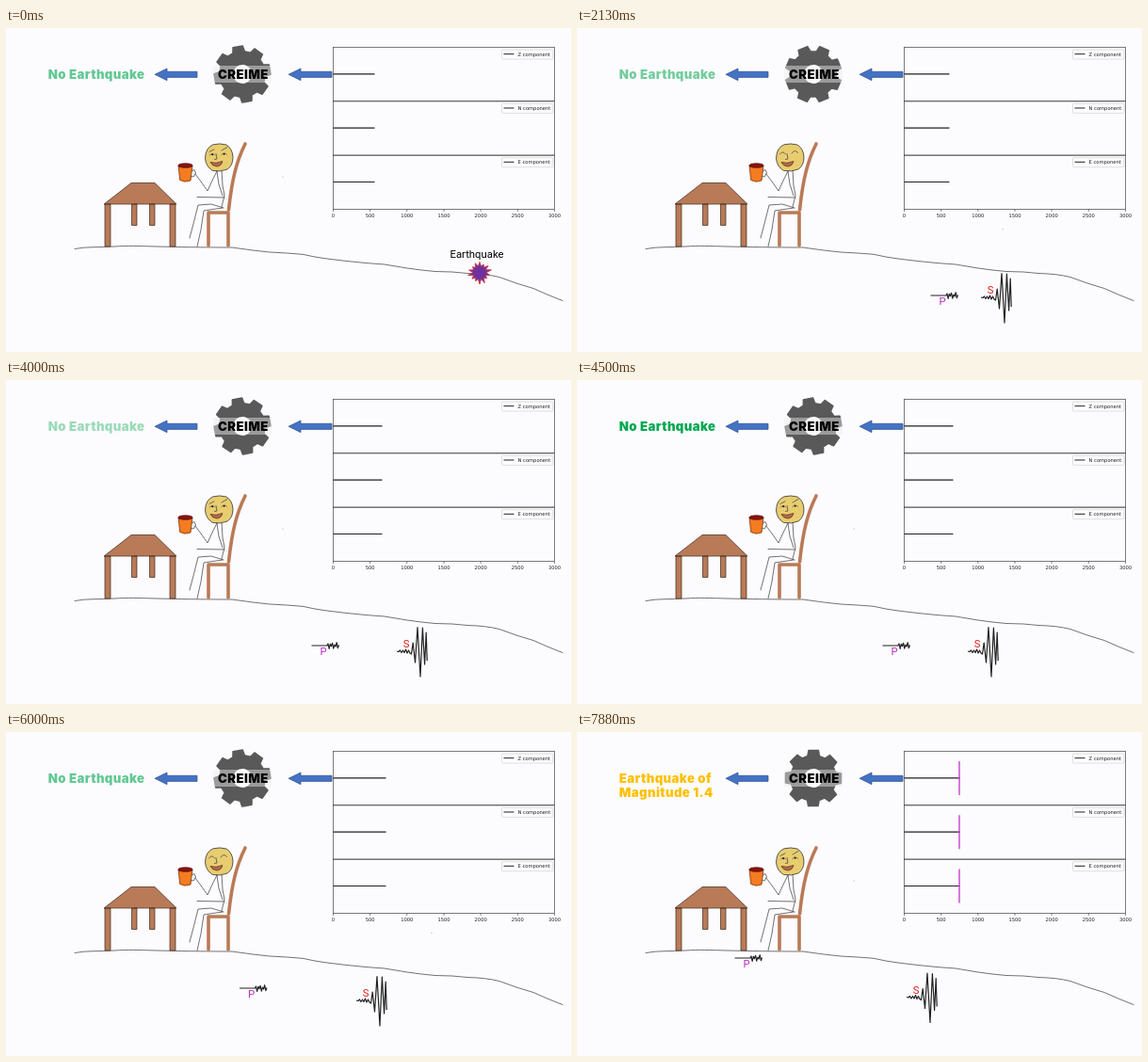
An HTML page for the animation above (8 s loop, 600 by 344 pixels).

```html
<!DOCTYPE html>
<html lang="en">
<head>
<meta charset="utf-8">
<title>Earthquake early warning</title>
<style>
  html, body { margin: 0; width: 100%; height: 100%; overflow: hidden; background: #fcfbfd; }
  svg { display: block; width: 600px; height: 344px; }
  .thin { fill: none; stroke: #444; stroke-width: .75; stroke-linejoin: round; stroke-linecap: round; }
  .wood { fill: #b97a57; stroke: #3a2a22; stroke-width: .7; }
  .chair { fill: none; stroke: #b97a57; stroke-width: 3.6; stroke-linecap: round; }
  .arrow { fill: #4472c4; stroke: #2f528f; stroke-width: .7; }
  .heavy { font: 900 13.2px Inter, "Open Sans", sans-serif; letter-spacing: .4px; }
  .label { font: 11.3px Roboto, sans-serif; }
  .plot { font: 5.2px "DejaVu Sans", sans-serif; fill: #222; }
  .axis { fill: none; stroke: #444; stroke-width: .7; }
  .wave { fill: none; stroke: #222; stroke-width: 1.2; stroke-linejoin: round; }
</style>
</head>
<body>
<svg viewBox="0 0 600 344">
  <rect width="600" height="344" fill="#fcfbfd"/>

  <g id="answer" class="heavy"><text id="line1" x="44.8" y="54"></text><text id="line2" x="44.8" y="69"></text></g>
  <path class="arrow" d="M158 49.3 L171 43 V46.3 H203 V52.4 H171 V55.7Z"/>
  <path class="arrow" d="M300 49.3 L313 43 V46.3 H346 V52.4 H313 V55.7Z"/>
  <path id="gear" fill="#595959" stroke="#595959" stroke-width="1.5" stroke-linejoin="round"/>
  <rect x="220" y="40" width="62" height="18" fill="#eee" opacity=".45"/>
  <circle cx="251" cy="49" r="10" fill="#fcfbfd"/>
  <text class="heavy" x="251.8" y="54" text-anchor="middle">CREIME</text>

  <g id="plots"></g>

  <path class="thin" d="M73 234.5 C85 232 100 233 115 232 S140 231.5 160 232 S210 233 240 233 L262 236 L280 238 Q300 239 315 240.3 L328 243 L341 245 L362 247.5 L382 249.5 L402 251 L426 255 L441 257 L456 258.5 Q475 258.5 490 260.5 Q510 261 524 264.5 L542 271 L560 276.5 L576 283.5 L591 289.5"/>

  <path class="wood" d="M133.5 187H139V209.5H133.5Z M152.5 187H158V209.5H152.5Z M105 187H111V232H105Z M174 187H180V232H174Z M104 187 L133 164.5H158L181 187Z"/>

  <path class="chair" d="M254 123 C245 141 240 160 236.5 193"/>
  <path class="chair" stroke-linejoin="round" d="M215 231V196H236V231"/>

  <path class="thin" d="M201 155 L207 163 L214 173 L219 162 L224 152 M224 152 L226 166 L230 178 M229 151 L230 167 L232 178 L229 190 M203 179.5 L232 180 M231 191 L218 187 L204 188 L200 204 L195 223 M230 191 L210 194 L207 214 L203 232"/>
  <path class="thin" d="M197 152 L200 150.5 L201.5 154 L199 158 L197 157.5"/>
  <path d="M183 146 L184.7 161.5 Q190 164.5 196 162 L198 146Z" fill="#f47c20" stroke="#7a3510" stroke-width=".8"/>
  <ellipse cx="190.5" cy="146" rx="7.6" ry="2.3" fill="#8b1012" stroke="#4a1410" stroke-width=".7"/>

  <path d="M220 123.8 Q227 122 234 124 Q240.5 128 241 137 Q241 146 235 150 Q228 153 219.5 151.5 Q212 147 211.5 138 Q212 127 220 123.8Z" fill="#e8cd70" stroke="#333" stroke-width=".8"/>
  <path class="thin" d="M223 133.5 L224 139 L221.5 139.5"/>
  <path d="M217 142.5 Q223 144.5 230 141.5 Q228.5 147 223.5 147 Q219 146.5 217 142.5Z" fill="#b5694a" stroke="#5a2a20" stroke-width=".7"/>
  <g id="awake">
    <path class="thin" d="M216 131.5 L221 128.8 M229 130 L235 126.5 M216.5 135 Q219 131.5 221.5 135 M229 134.5 Q232 131 234.5 134.5"/>
    <circle cx="219.2" cy="134.3" r=".9"/><circle cx="231.6" cy="133.8" r=".9"/>
  </g>
  <path id="asleep" class="thin" d="M215.5 134 Q218.5 129.5 221.5 134 M228 133 Q231.5 128 234.5 132.5"/>
  <circle id="speck" r=".5" fill="#888"/>

  <g id="quake">
    <text class="label" x="500" y="243.6" text-anchor="middle">Earthquake</text>
    <path id="burst" fill="#7030a0" stroke="#c8383f" stroke-width=".9"/>
  </g>
  <g id="pWave"><path class="wave"/><text class="label" x="9" y="10.3" fill="#b92fc0">P</text></g>
  <g id="sWave"><path class="wave"/><text class="label" x="6.8" y="-4" fill="#e0201c">S</text></g>
</svg>
<script>
const LOOP = 8000, FADE = 460, SPIN = 800;
const $ = id => document.getElementById(id);
const show = (el, on) => el.setAttribute('visibility', on ? 'visible' : 'hidden');
const polar = (cx, cy, r, deg) => {
  const a = (deg - 90) * Math.PI / 180;
  return (cx + r * Math.cos(a)).toFixed(2) + ' ' + (cy + r * Math.sin(a)).toFixed(2);
};

// start time, end of the traces, positions of the P and S waves
const slides = [
  { at: -278, end: 391.5 },
  { at: 1880, end: 395.5, p: [375.5, 284], s: [429, 286] },
  { at: 3825, end: 399.5, p: [324.5, 282], s: [415, 288] },
  { at: 5722, end: 403.5, p: [248, 272], s: [372, 285] },
  { at: 7380, end: 407, p: [167.5, 240], s: [350, 281.5], pick: true }
];

function buildGear() {
  const pts = [];
  for (let a = 0; a < 360; a += 45)
    for (const [r, d] of [[24.3, -15], [30, -10], [30, 10], [24.3, 15]]) pts.push(polar(251, 49, r, a + d));
  $('gear').setAttribute('d', 'M' + pts.join('L') + 'Z');
}

function buildBurst() {
  const pts = [];
  for (let i = 0; i < 28; i++) {
    const r = i % 2 ? 7 : 11.2 + 1.6 * Math.sin(i * 2.3);
    pts.push(polar(503, 259.7, r, i * 360 / 28));
  }
  $('burst').setAttribute('d', 'M' + pts.join('L') + 'Z');
}

function buildWaves() {
  let p = 'M0 0H16.5';
  for (let i = 0; i < 11; i++) p += `L${17.5 + i * 1.15} ${(i % 2 ? 1 : -1) * (2 + 1.5 * Math.sin(i * 1.7))}`;
  $('pWave').firstChild.setAttribute('d', p);
  $('sWave').firstChild.setAttribute('d',
    'M0 0L2 .5 3.5 -1 5 1.5 6.5 -1 8 1.5 9.5 -2 11 2 12.5 -1 14 2 15.5 3 17.2 -9 19.5 12 22 -25.5 25 27 27.4 -25 29.6 14 31.2 -20 32.2 10');
}

function buildPlots() {
  const out = [];
  ['Z', 'N', 'E'].forEach((name, i) => {
    const y = 20.5 + i * 57.3, mid = y + 28.4;
    out.push(`<rect class="axis" x="347.5" y="${y}" width="235" height="57.3"/>
      <path class="trace" stroke="#222" stroke-width="1.2" data-y="${mid}"/>
      <path class="pick" stroke="#c94fd0" stroke-width="1.5" d="M406 ${mid - 18}v36"/>
      <rect x="526.5" y="${y + 2.6}" width="54.5" height="10" rx="1" fill="none" stroke="#ccc" stroke-width=".6"/>
      <path stroke="#222" d="M528.5 ${y + 7.2}h11"/>
      <text class="plot" x="543.5" y="${y + 9.2}">${name} component</text>`);
  });
  for (let v = 0; v <= 3000; v += 500) {
    const x = 347.5 + v * 235 / 3000;
    out.push(`<path stroke="#444" stroke-width=".7" d="M${x} 192.4v2.4"/>
      <text class="plot" x="${x}" y="200.6" text-anchor="middle">${v}</text>`);
  }
  $('plots').innerHTML = out.join('');
}

function place(el, pos) {
  show(el, pos);
  if (pos) el.setAttribute('transform', `translate(${pos})`);
}

function setSlide(n) {
  const s = slides[n], awake = n % 2 === 0;
  document.querySelectorAll('.trace').forEach(el =>
    el.setAttribute('d', `M347.5 ${el.dataset.y}H${s.end}`));
  document.querySelectorAll('.pick').forEach(el => show(el, s.pick));
  show($('quake'), n === 0);
  place($('pWave'), s.p);
  place($('sWave'), s.s);
  show($('awake'), awake);
  show($('asleep'), !awake);
  $('speck').setAttribute('transform', awake ? 'translate(294 158)' : 'translate(452 213.5)');
  $('line1').textContent = s.pick ? 'Earthquake of' : 'No Earthquake';
  $('line2').textContent = s.pick ? 'Magnitude 1.4' : '';
  $('answer').setAttribute('fill', s.pick ? '#ffc000' : '#00a850');
}

let current = -1;
function draw(t) {
  let n = slides.length - 1;
  while (slides[n].at > t) n--;
  if (n !== current) setSlide(current = n);
  const age = t - slides[n].at;
  $('answer').setAttribute('opacity', Math.min(1, age / FADE));
  $('gear').setAttribute('transform', `rotate(${360 * Math.min(1, age / SPIN)} 251 49)`);
}

buildGear();
buildBurst();
buildWaves();
buildPlots();

const start = performance.now();
function tick() {
  draw((performance.now() - start) % LOOP);
  requestAnimationFrame(tick);
}
tick();
</script>
</body>
</html>
```
